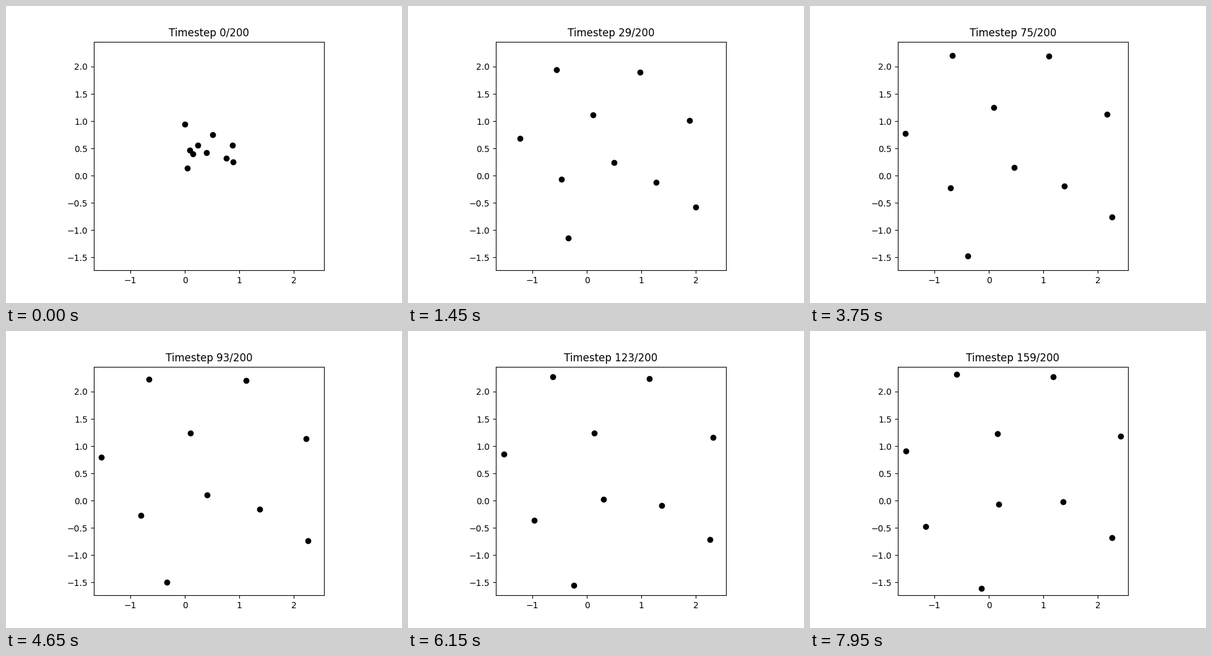
Write a matplotlib script that moves like this. It is 640 px wide and 480 px high and loops after 8 s.

```python
import numpy as np
import matplotlib.pyplot as plt
from matplotlib.animation import FuncAnimation

FRAMES, STEP_MS, TOTAL = 160, 50, 200
SCALE, X0, Y0 = 88.15, 289.18, 274.25   # pixels per unit, pixel place of zero
LEFT, RIGHT, TOP, BOTTOM = 142, 514, 57.6, 427.2

BURST_END = 58   # step at which the fast spreading gives way to slow drift
RISE = 1.8       # steps over which the burst starts to slow down

# Each particle in stage pixels: where it starts, spreads to, and drifts to
PARTICLES = np.array([
    [(289, 191), (228, 82), (237, 70)],
    [(334, 208), (385, 83), (393, 74)],
    [(366, 225), (476, 176), (502, 170)],
    [(310, 225), (296, 164), (303, 166)],
    [(297, 233), (154, 209), (155, 194)],
    [(302, 239), (235, 289), (187, 316)],
    [(324, 237), (335, 257), (305, 280)],
    [(356, 246), (411, 294), (409, 276)],
    [(367, 252), (488, 342), (488, 334)],
    [(293, 262), (251, 401), (277, 416)],
], dtype=float)
START, SPREAD, END = PARTICLES.transpose(1, 0, 2)


def to_data(x, y):
    return (x - X0) / SCALE, (Y0 - y) / SCALE


def positions(step):
    """Repulsion: a logarithmic burst outwards, then a steady drift."""
    burst = np.log1p(min(step, BURST_END) / RISE) / np.log1p(BURST_END / RISE)
    drift = max(step - BURST_END, 0) / (FRAMES - 1 - BURST_END)
    p = START + (SPREAD - START) * burst + (END - SPREAD) * drift
    return to_data(p[:, 0], p[:, 1])


fig, ax = plt.subplots(figsize=(6.4, 4.8), dpi=100)
ax.set_aspect("equal")
x_min, y_min = to_data(LEFT, BOTTOM)
x_max, y_max = to_data(RIGHT, TOP)
ax.set_xlim(x_min, x_max)
ax.set_ylim(y_min, y_max)
ax.set_xticks(range(-1, 3))
ax.set_yticks(np.arange(-1.5, 2.1, 0.5))
dots, = ax.plot([], [], "ko")
title = ax.set_title("")


def update(step):
    dots.set_data(*positions(step))
    title.set_text(f"Timestep {step}/{TOTAL}")
    return dots, title


anim = FuncAnimation(fig, update, frames=FRAMES, interval=STEP_MS,
                     repeat=True, repeat_delay=0, blit=False)
plt.show()
```
